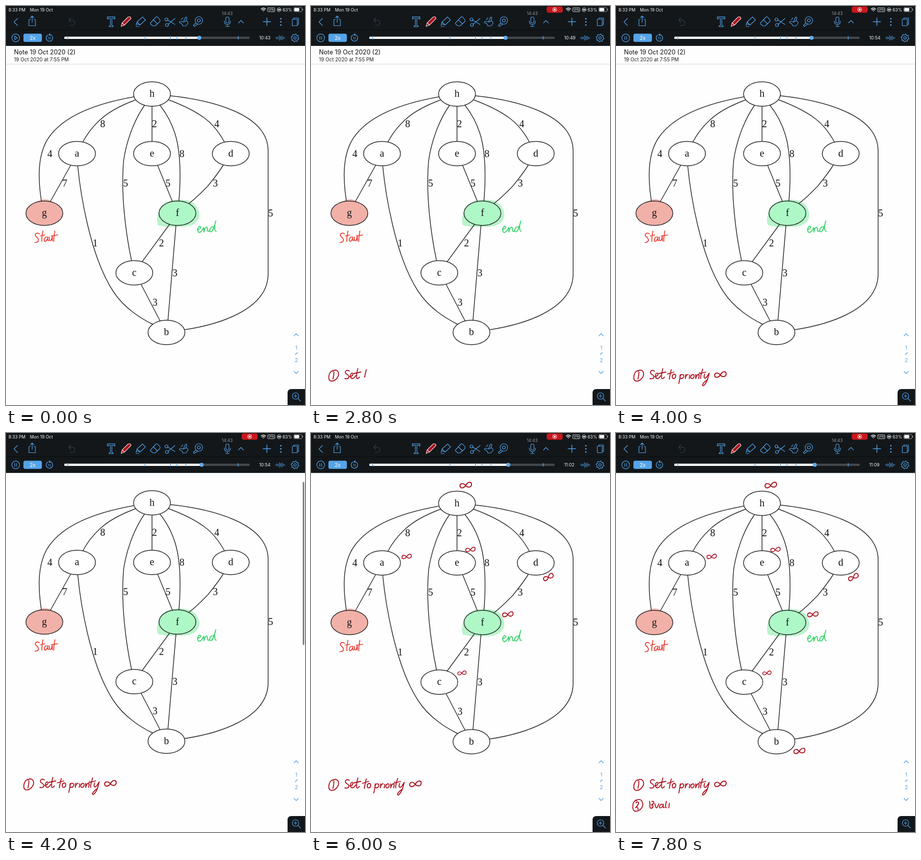
An HTML page that plays this animation: 600 px wide and 800 px high, repeating every 8 s.

```html
<!DOCTYPE html>
<html lang="en">
<head>
<meta charset="utf-8">
<title>Graph notes playback</title>
<style>
  html, body { margin: 0; width: 100%; height: 100%; overflow: hidden; background: #fff; }
  svg { display: block; width: 600px; height: 800px; font-family: Inter, sans-serif; }
  .line { fill: none; stroke-linecap: round; stroke-linejoin: round; }
  .icon { stroke: #4f9fe6; stroke-width: 1.2; }
  .blue { fill: #4f9fe6; }
  .graph { font: 20px "Liberation Serif", serif; text-anchor: middle; fill: #111; }
  .edge { stroke: #2c2c2c; stroke-width: 1.5; }
  .pen { stroke: #ab0c1a; stroke-width: 1.8; }
  .white { fill: #f4f4f4; }
</style>
</head>
<body>
<svg viewBox="0 0 600 800">
  <rect width="600" height="800" fill="#fefefe"/>

  <g id="page">
    <text x="16" y="97" font-size="12.5" fill="#111">Note 19 Oct 2020 (2)</text>
    <text x="16" y="110.5" font-size="10" fill="#222">19 Oct 2020 at 7:55 PM</text>
    <path d="M0,116.5H600" stroke="#cdd9e4"/>
    <path d="M304,437C301,425 306,412 312,402C318,392 340,386 360,389C377,391 388,404 388,420C386,436 372,443 350,443C335,441 325,446 314,441C308,441 304,440 304,437Z" fill="#b9f4cb"/>
    <path d="M62,395C66,386 88,384 92,394L92,410H62Z" fill="#f5bdb6"/>
    <g id="graph" class="graph"></g>
    <path class="line" stroke="#e8382c" stroke-width="1.7" d="M67,457C62,453 56,458 60,462C67,467 67,474 58,474
      M74,451C73,460 71,467 72,472M69,461L78,459
      M82,463C77,463 75,472 79,472C82,471 84,466 84,463C83,468 84,472 86,470
      M87,463C86,468 88,473 91,469L93,462L93,471
      M98,451C97,460 95,468 96,472M91,461L104,459"/>
    <path class="line" stroke="#35d468" stroke-width="1.8" d="M384,448C389,448 392,444 390,442C386,440 382,450 387,454C391,455 394,450 397,444
      L397,453C399,445 403,440 404,446C404,451 405,454 408,451
      M416,443C409,442 407,452 411,453C415,452 419,440 421,431C418,440 417,450 422,452"/>
    <g id="ink" class="line pen"></g>
  </g>

  <rect id="scrollbar" x="595.5" y="98" width="3" height="327" rx="1.5" fill="#777"/>

  <rect width="600" height="80" fill="#13171a"/>
  <path d="M0,47.5H600" stroke="#0b0d0f"/>

  <g class="white" font-size="8.6">
    <text x="5" y="11">8:33 PM</text>
    <text x="48" y="11">Mon 19 Oct</text>
    <text x="555" y="11">63%</text>
    <text x="526.5" y="9.8" font-size="5.5">VPN</text>
    <rect x="578.5" y="4" width="10" height="6.5" rx="1.5"/>
    <path d="M595.5,5.5v3.5" stroke="#bbb"/>
  </g>
  <g class="line" stroke="#f0f0f0">
    <rect x="577.5" y="3" width="16.5" height="8.5" rx="2" stroke="#aaa" stroke-width=".8"/>
    <rect x="525" y="3.5" width="14.5" height="8" rx="1.5" stroke-width=".8"/>
    <path d="M512,6Q516.5,2 521,6M514,8.3Q516.5,6 519,8.3M516.5,10.4h.1" stroke-width="1.5"/>
    <circle cx="548" cy="7.5" r="3.8" stroke-width=".9"/>
    <path d="M546.8,7.5h2.5" stroke-width="2.5"/>
  </g>
  <g id="recording">
    <rect x="473" y="1" width="32" height="12.5" rx="4" fill="#c9171c"/>
    <circle cx="489" cy="7.2" r="4" fill="none" stroke="#fff" stroke-width=".9"/>
    <circle cx="489" cy="7.2" r="2" fill="#fff"/>
  </g>
  <text x="444" y="18" font-size="8.5" fill="#92979b" text-anchor="middle">14:43</text>

  <g class="line icon">
    <path d="M23,25L16,32L23,39M49,27H46V39.5H59V27H56M52.5,33V20M49,23.5L52.5,20L56,23.5"/>
    <path d="M130,24L126,28.5L130,33M126,28.5H133C140,29 140,39 133,39H129" stroke="#33414d"/>
    <path d="M203.5,21.5H218.5V26H216.5V24H212.5V39.5H215V41.5H207V39.5H209.5V24H205.5V26H203.5Z"/>
    <path d="M261,39L263,32L274,22L280,28L269,38L263,36M263,32L269,38M261,41H267"/>
    <path d="M290,34L301,22Q303,21 305,23L309,28Q310,30 308,32L299,40H295L290,36ZM296,28L304,36"/>
    <path d="M324,28L339,37M325,37L339,25M329,31h2"/>
    <circle cx="322" cy="27" r="3"/><circle cx="323" cy="38" r="3"/>
    <path d="M353,36L348,33Q348,30 352,31L356,32L360,23Q362,21 363,24L361,30Q366,30 365,35L361,40H355ZM357,32L361,30M352,27L355,24"/>
    <circle cx="387" cy="29" r="7.5"/><circle cx="387" cy="29" r="3"/>
    <path d="M381,34L376,39L378,41L385,36"/>
    <rect x="441" y="22" width="6.5" height="12" rx="3.2"/>
    <path d="M438,30Q438,37 444.2,37Q450.5,37 450.5,30M444.2,37V41M440.5,41H448M466.5,34L471.5,29L476.5,34"/>
    <path d="M516,31.5H531M523.5,24V39" stroke-width="1.5"/>
    <path d="M577.5,26V24H587V37H585M574.5,26.5H584.5V39.5H574.5Z"/>
    <path d="M551.5,25.5h.1M551.5,31.8h.1M551.5,38h.1" stroke-width="3"/>
    <circle cx="19.5" cy="64" r="7.8"/>
    <path id="playIcon" d="M17.5,60.5V67.5L23,64Z"/>
    <path id="pauseIcon" d="M17.7,61V67M21.3,61V67"/>
    <path d="M84,58.2A6.6,6.6 0 1 0 87,57.4M88.5,55.5L86,57.4L88.5,59.3"/>
    <path d="M541.5,63v2M544,61.5v5M546.5,62.5v3M549,59v10M551.5,61v6M554,60v8M556.5,62v4M559,63v2" stroke-width="1.1"/>
    <circle cx="580" cy="64" r="2.5"/>
    <g id="gear"></g>
  </g>
  <g class="line" stroke="#f1d9d9" stroke-width="1.1">
    <path d="M231,41L233,34L245,22Q250,20 251,25L238,38Z" fill="#ab111e"/>
    <path d="M233,34L238,38"/>
  </g>
  <rect x="35" y="55.5" width="37" height="16.5" rx="3.5" fill="#55a3e8"/>
  <text x="53.5" y="67.5" font-size="10.5" fill="#fff" text-anchor="middle">2x</text>
  <text x="87" y="66.5" font-size="6.5" class="blue" text-anchor="middle">10</text>

  <rect x="117" y="61.5" width="372" height="4.5" rx="1.5" fill="#44494d"/>
  <rect id="played" x="117" y="61.5" height="4.5" rx="1.5" fill="#fff"/>
  <path d="M124,60.5v6.5M279,60.5v6.5M330,60.5v6.5M343,60.5v6.5M361,60.5v6.5M466,60.5v6.5" stroke="#4f9fe6" stroke-width="1.5"/>
  <circle id="knob" cy="63.7" r="4" fill="#61adf0"/>
  <text id="clock" class="white" x="508" y="67" font-size="8.8"></text>

  <g class="blue" font-size="10" text-anchor="middle">
    <text x="582.5" y="688.5">1</text><text x="582.5" y="713.5">2</text>
  </g>
  <path class="line icon" d="M578,661.5L582.3,657L586.5,661.5M580.5,699L584.5,695M578,732.5L582.3,737L586.5,732.5"/>
  <path d="M565,800V776Q565,768 573,768H600V800Z" fill="#13171a"/>
  <g class="line icon"><circle cx="581" cy="782" r="6.5"/><path d="M586,787L591,792M578,782H584M581,779V785"/></g>
</svg>

<script>
const LOOP = 8000, STEP = 200;
const $ = id => document.getElementById(id);

function add(parent, tag, attrs, text) {
  const node = document.createElementNS('http://www.w3.org/2000/svg', tag);
  for (const key in attrs) node.setAttribute(key, attrs[key]);
  if (text) node.textContent = text;
  return parent.appendChild(node);
}

const edges = [
  'M257,182C200,192 122,213 87,262C61,298 65,352 71,391',
  'M261,188C236,197 207,211 188,229C174,242 162,258 154,273',
  'M278,199C255,232 241,275 236,310C230,375 240,455 252,511',
  'M293,201V272',
  'M309,199C327,222 339,250 344,275C351,312 350,355 347,391',
  'M326,188C350,197 378,209 400,226C416,238 429,256 438,272',
  'M330,180C404,188 526,214 526,290V537C526,612 418,640 359,649',
  'M130,319L89,392',
  'M144,321C149,373 168,500 215,572C235,603 268,625 294,638',
  'M304,319L334,392',
  'M436,319C425,337 412,352 405,361C394,372 381,386 367,396',
  'M328,438L273,513M341,440L325,630M271,558L309,631'
];
const nodes = [
  ['h', 293, 176.5], ['a', 142.5, 296], ['e', 293, 296], ['d', 451, 296],
  ['g', 77, 415.5, '#f2b1a8'], ['f', 344, 415.5, '#aef8c7'], ['c', 257.5, 535], ['b', 322, 654.5]
];
const weights = [
  [4, 88, 296], [8, 194, 236], [2, 298, 236], [4, 423, 236], [8, 353, 296], [7, 118, 355], [5, 240, 355],
  [5, 325, 355], [3, 420, 355], [5, 531, 415], [1, 179, 475], [2, 312, 475], [3, 339, 535], [3, 299, 594]
];
const graph = $('graph');
add(graph, 'path', { class: 'line edge', d: edges.join('') });
for (const [name, cx, cy, fill = '#fff'] of nodes) {
  add(graph, 'ellipse', { class: 'edge', cx, cy, rx: 37, ry: 24.5, fill });
  add(graph, 'text', { x: cx, y: cy + 5.5 }, name);
}
for (const [weight, x, y] of weights) add(graph, 'text', { x, y: y + 6.5 }, weight);

const teeth = Array.from({ length: 32 }, (_, i) => {
  const angle = (i + .5) * Math.PI / 16, r = i % 4 < 2 ? 7.8 : 6;
  return `${(580 + r * Math.cos(angle)).toFixed(1)},${(64 + r * Math.sin(angle)).toFixed(1)}`;
});
add($('gear'), 'path', { d: `M${teeth.join('L')}Z` });

// Each pen stroke is revealed along its length between its start and end.
const strokes = [];
function write(start, end, d, transform = '') {
  const parts = d.match(/M[^M]+/g), span = (end - start) / parts.length;
  parts.forEach((part, i) => strokes.push({
    start: start + i * span, span,
    path: add($('ink'), 'path', { d: part, pathLength: 1, transform })
  }));
}
function infinity(start, x, y, size = 1, tilt = 0) {
  write(start, start + 190, 'M0,0c-4,-5 -10,-4 -10,1c0,5 7,5 11,-2c4,-6 10,-6 10,-1c0,6 -7,7 -11,2',
    `translate(${x} ${y}) rotate(${tilt}) scale(${size})`);
}

write(2000, 2740,
  'M43,731C35,735 33,750 40,752C49,753 57,743 55,735C53,729 47,729 44,732' +
  'M46,734C46,740 45,744 44,748' +
  'M77,732C71,728 66,734 71,738C79,742 77,749 68,747' +
  'M78,743C83,743 86,738 83,736C79,735 77,746 83,747C86,747 88,744 90,741' +
  'M94,727C92,735 90,742 92,747C94,748 96,746 97,744M86,737L100,734');
write(2740, 3780,
  'M111,729C109,736 108,742 107,748M103,738L116,734' +
  'M117,738C111,739 112,748 116,747C121,746 121,738 117,738' +
  'M129,739C129,746 127,752 126,757M128,742C133,735 140,741 134,746C132,748 130,747 128,746' +
  'M140,739L139,747C140,742 142,738 145,739' +
  'M148,740L147,747' +
  'M154,739C149,740 149,748 153,747C158,746 158,738 154,739' +
  'M160,739L160,747C161,742 163,738 165,740' +
  'M167,740L166,747M168,735h.4' +
  'M174,728C172,735 169,742 170,747M165,738L180,734' +
  'M178,738C175,745 178,749 182,744L187,736C185,746 181,757 176,761C171,763 174,755 184,749');
infinity(3800, 209, 739.5, 1.1);

infinity(4500, 310, 140.5, 1.1);
infinity(4750, 191.5, 283.5, .9);
infinity(5000, 319.5, 269.5, .9);
infinity(5250, 476, 325, 1, -20);
infinity(5500, 394.5, 399.5);
infinity(5750, 302.5, 517, .8);
infinity(6000, 367.5, 673.5, 1.05);

write(7250, 7800,
  'M41,771C32,775 31,793 39,794C49,794 56,784 53,776C51,769 44,769 40,773' +
  'M40,777C44,773 47,776 44,781C42,785 38,788 40,786C43,784 45,788 44,791' +
  'M67,774C70,780 66,787 70,788C74,788 77,782 71,781C77,779 78,774 72,774' +
  'M78,779C79,784 80,788 82,787C84,784 85,782 86,779' +
  'M93,780C87,779 85,788 90,787C93,786 95,782 95,780C94,785 95,788 97,786' +
  'M101,774C100,780 98,787 101,787' +
  'M107,778L106,787');

const show = (id, visible) => $(id).setAttribute('opacity', visible ? 1 : 0);

function draw(t) {
  const playing = t >= 1200;
  show('recording', t >= 800);
  show('playIcon', !playing);
  show('pauseIcon', playing);

  const seconds = 643 + Math.floor(Math.max(0, t - 1250) / 250);
  const x = 117 + 372 * seconds / 883;
  $('played').setAttribute('width', x - 117);
  $('knob').setAttribute('cx', x);
  $('clock').textContent = `${Math.floor(seconds / 60)}:${String(seconds % 60).padStart(2, '0')}`;

  const scroll = t < 4200 ? 0 : t < 4600 ? 36.5 : 35.5;
  $('page').setAttribute('transform', `translate(0 ${-scroll})`);
  show('scrollbar', t >= 4200 && t < 5000);

  for (const { start, span, path } of strokes) {
    const progress = Math.min(1, Math.max(0, (t - start) / span));
    path.setAttribute('visibility', progress ? 'visible' : 'hidden');
    path.setAttribute('stroke-dasharray', progress < 1 ? `${progress} 2` : 'none');
  }
}

const origin = performance.now();
function tick() {
  const t = (performance.now() - origin) % LOOP;
  draw(Math.floor(t / STEP) * STEP);
  requestAnimationFrame(tick);
}
tick();
</script>
</body>
</html>
```
